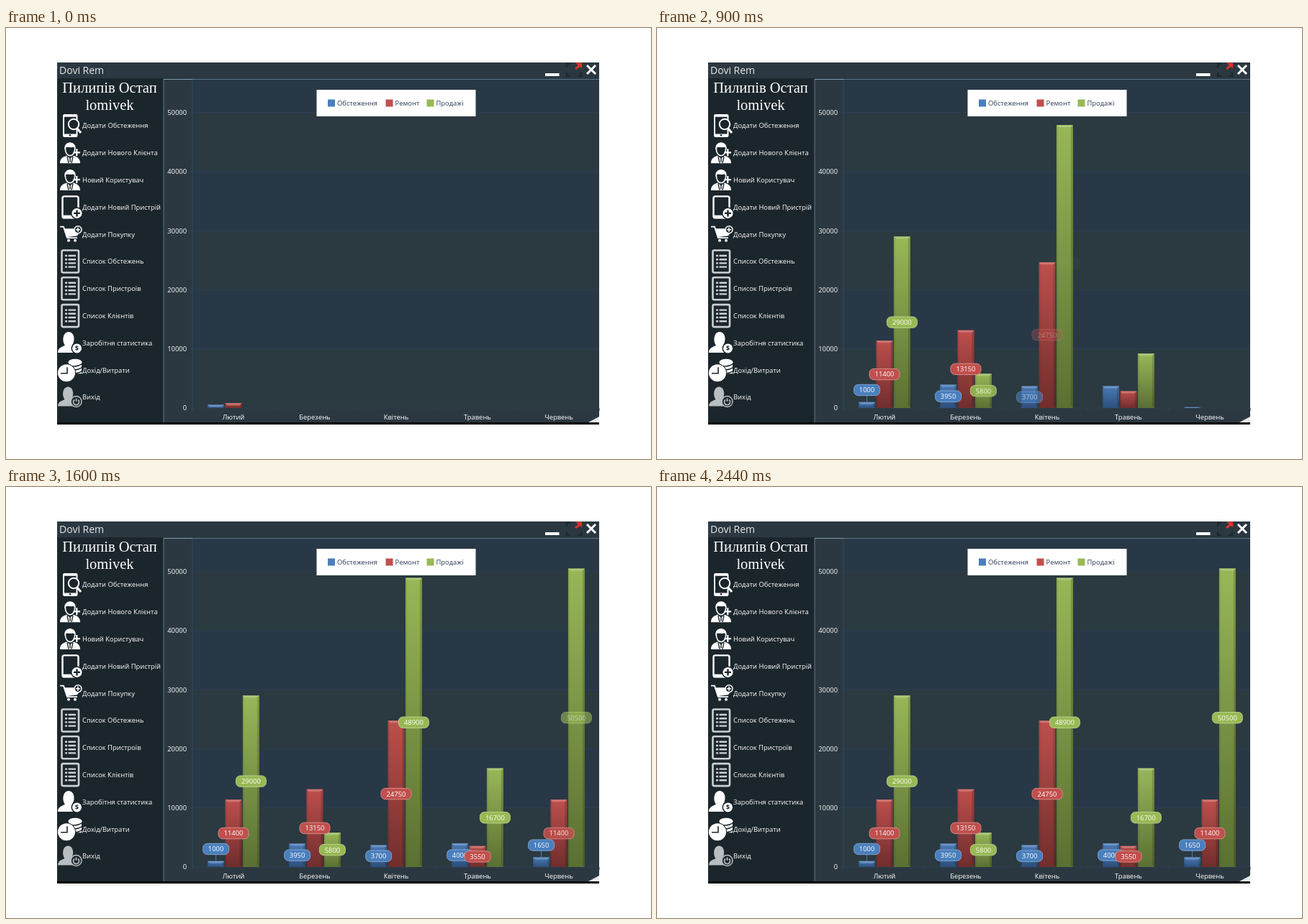
Recreate the animation shown at these times as an HTML page. Size 896 by 600 pixels, loop 3.5 s.

```html
<!DOCTYPE html>
<html lang="uk">
<head>
<meta charset="utf-8">
<style>
  html, body { margin: 0; width: 100%; height: 100%; overflow: hidden; background: #fff; }
  svg { display: block; }
  text { font: 500 9.4px "Open Sans", "Noto Sans", sans-serif; fill: #fff; }
  .mid { text-anchor: middle; }
  .end { text-anchor: end; }
  .title { font-size: 14px; font-weight: 400; fill: #e4e9ec; }
  .user { font: 20.5px "Liberation Serif", serif; text-anchor: middle; }
  .key { fill: #2b3b55; }
</style>
</head>
<body>
<svg width="896" height="600" viewBox="0 0 896 600">
  <defs>
    <linearGradient id="g0" x2="0" y2="1"><stop stop-color="#4a7ab5"/><stop offset="1" stop-color="#2d507c"/></linearGradient>
    <linearGradient id="g1" x2="0" y2="1"><stop stop-color="#bd4f4c"/><stop offset="1" stop-color="#702e2d"/></linearGradient>
    <linearGradient id="g2" x2="0" y2="1"><stop stop-color="#98b758"/><stop offset="1" stop-color="#5a7032"/></linearGradient>

    <g id="search" fill="none" stroke="#fff">
      <rect x="-9" y="-15" width="18.500" height="30" rx="1.500" stroke-width="2"/>
      <path d="M-9 13.300H9.500M-9 -14H9.500" stroke-width="3.600"/>
      <circle cx="5" cy="-2" r="7.200" fill="#1b262c" stroke-width="2"/>
      <path d="M10 4l5 6" stroke-width="3"/>
      <circle cy="13.300" r="1.200" fill="#1b262c" stroke="none"/>
    </g>
    <g id="client" fill="#fff">
      <path d="M-14 14.500C-14 7.500 -10 6 -5 4L0 8L5 4C10 6 14 7.500 14 14.500Z"/>
      <path d="M-6.500 -6C-7 -1 -4 4 0 4S7 -1 6.500 -6" fill="#1b262c" stroke="#fff" stroke-width="1.500"/>
      <path d="M-7.500 -4C-10 -18 10 -18 7.500 -4L5 -8C1 -7 -2 -8 -5 -8Z"/>
      <path d="M-4 5L-2 14M4 5L2 14M0 7V13" fill="none" stroke="#1b262c" stroke-width="1.400"/>
      <path d="M4.500 -.5H14M9.300 -5.500V4.500" stroke="#fff" stroke-width="2.200"/>
    </g>
    <g id="device">
      <rect x="-10.500" y="-15" width="22" height="30" rx="2.500" fill="none" stroke="#fff" stroke-width="2.400"/>
      <path d="M-10 13.500H11" stroke="#fff" stroke-width="4.500"/>
      <circle cx="9.500" cy="8.500" r="8.500" fill="#1b262c"/>
      <circle cx="9.500" cy="8.500" r="7" fill="#fff"/>
      <path d="M5 8.500H14M9.500 4V13" stroke="#1b262c" stroke-width="2.400"/>
    </g>
    <g id="cart">
      <path d="M-14 -10.500H-9L-4 5H10" fill="none" stroke="#fff" stroke-width="1.800"/>
      <path d="M-9 -8H5L12 -1L10 2L-5 4Z" fill="#fff"/>
      <circle cx="-2" cy="8.500" r="2" fill="#fff"/><circle cx="7" cy="8.500" r="2" fill="#fff"/>
      <circle cx="11" cy="-6.500" r="5" fill="#1b262c" stroke="#fff" stroke-width="1.500"/>
      <path d="M8 -6.500H14M11 -9.500V-3.500" stroke="#fff" stroke-width="1.600"/>
    </g>
    <g id="list" fill="none" stroke="#cbd1d4">
      <rect x="-11.500" y="-15.500" width="23.500" height="31" rx="2" stroke-width="2.600"/>
      <path d="M-7 -8H-4M-2.500 -8H8M-7 -2.800H-4M-2.500 -2.800H8M-7 2.400H-4M-2.500 2.400H8M-7 7.600H-4M-2.500 7.600H8" stroke-width="2.400"/>
    </g>
    <path id="person" d="M-17 13.500C-17 6 -11 6 -7 3C-11 -1 -11 -15 -2 -15.500C7 -15 7 -2 3 3C6 6 13 6 13 13.500Z"/>
    <g id="pay">
      <use href="#person" fill="#fff"/>
      <circle cx="9.500" cy="7.500" r="8" fill="#1b262c"/><circle cx="9.500" cy="7.500" r="6.500" fill="#fff"/>
      <text x="9.500" y="11" class="mid" style="fill:#1b262c;font-weight:700">$</text>
    </g>
    <g id="money">
      <path d="M-2 -10V5H16V-10Z" fill="#fff"/>
      <ellipse cx="7" cy="-11" rx="9.500" ry="4.500" fill="#fff"/>
      <path d="M-3 -8Q7 -2 17 -9M-3 -3Q7 3 17 -4M-3 2Q7 8 17 1" fill="none" stroke="#1b262c" stroke-width="1.300"/>
      <circle cx="-5" cy="4" r="13" fill="#1b262c"/><circle cx="-5" cy="4" r="12" fill="#fff"/>
      <path d="M-4 -4V4.500H-13" fill="none" stroke="#1b262c" stroke-width="1.600"/>
    </g>
    <g id="exit">
      <use href="#person" fill="#b9bec1" transform="translate(-1 0) scale(.93)"/>
      <circle cx="8.500" cy="6" r="7.500" fill="#1b262c" stroke="#b9bec1" stroke-width="1.500"/>
      <path d="M6 3.500A4 4 0 1 0 11 3.500M8.500 1.500V6" fill="none" stroke="#b9bec1" stroke-width="1.700"/>
    </g>
  </defs>
  <g id="stage"></g>
  <g id="chart"></g>
</svg>
<script>
const BASE = 529, UNIT = 0.00823;
const months = ["Лютий", "Березень", "Квітень", "Травень", "Червень"];
const series = [
  { name: "Обстеження", fill: "#4a7fbd", light: "#86a9d4", x: 447 },
  { name: "Ремонт", fill: "#c0504d", light: "#dc8f8d", x: 527.5 },
  { name: "Продажі", fill: "#98b954", light: "#bdd391", x: 584.5 }
];
const values = [1000, 11400, 29000, 3950, 13150, 5800, 3700, 24750, 48900,
  4000, 3550, 16700, 1650, 11400, 50500];
const menu = [
  ["search", "Додати Обстеження"], ["client", "Додати Нового Клієнта"],
  ["client", "Новий Користувач"], ["device", "Додати Новий Пристрій"],
  ["cart", "Додати Покупку"], ["list", "Список Обстежень"],
  ["list", "Список Пристроїв"], ["list", "Список Клієнтів"],
  ["pay", "Заробітня статистика"], ["money", "Дохід/Витрати"], ["exit", "Вихід"]
];
// time in ms, position of the growth wave
const wave = [[0, .145], [400, .678], [900, 1.578], [1300, 2.24], [1600, 2.61], [2440, 3.6]];
const LAG = .13;

const clamp = v => Math.max(0, Math.min(1, v));
const rect = (x, y, w, h, fill, more = "") =>
  `<rect x="${x}" y="${y}" width="${w}" height="${h}" fill="${fill}" ${more}/>`;
const path = (d, more) => `<path d="${d}" ${more}/>`;
const text = (x, y, s, cls = "") => `<text x="${x}" y="${y + 3.4}" class="${cls}">${s}</text>`;

function drawStage() {
  let s = rect(71, 48, 753, 504, "#2b3841") + rect(71, 70, 147.5, 479, "#1b262c");
  for (let i = 0; i < 6; i++) {
    const y = BASE - i * 82.3, top = i < 5 ? y - 82.3 : 72;
    s += rect(259, top, 565, y - top, i % 2 ? "#293846" : "#2b3940");
    s += path(`M254 ${y}H824`, 'stroke="#2b405a" stroke-width=".8"');
    s += text(251, y, i * 10000, "end");
  }
  s += path("M259 72V533", 'stroke="#2d4864"');
  for (let i = 1; i < 6; i++) s += path(`M${259 + i * 113} 529v4`, 'stroke="#2b405a"');
  s += path("M219 549V71.500H824", 'fill="none" stroke="#58758b"');
  s += path("M219 71.500H259", 'stroke="#7f9aac"');
  s += rect(71, 549, 753, 3, "#000") + path("M824 541V549H809Z", 'fill="#e8ecea"');

  s += text(74, 60.2, "Dovi Rem", "title");
  s += rect(749, 63, 19.5, 4, "#fff");
  s += path("M779 55V50H784M779 62V67H784M799 62V67H794", 'fill="none" stroke="#1b2a2f" stroke-width="2.5"');
  s += path("M791 48.500H800V56L797 54L792 58L790 56L795 52Z", 'fill="#e0342c"');
  s += path("M807 52L819 64M819 52L807 64", 'stroke="#fff" stroke-width="3"');
  s += text(144, 86.5, "Пилипів Остап", "user") + text(144, 110.5, "lomivek", "user");
  menu.forEach(([icon, label], i) => {
    const y = 136 + i * 37.8;
    s += `<use href="#${icon}" x="89" y="${y}"/>` + text(106, y, label);
  });

  s += rect(431.5, 86, 221, 37, "#fff");
  series.forEach(k => s += rect(k.x, 99.5, 10, 10, k.fill) + text(k.x + 13, 105, k.name, "key"));
  months.forEach((m, i) => s += text(316 + i * 113, 541.5, m, "mid"));
  document.getElementById("stage").innerHTML = s;
}

function wavePos(t) {
  let i = 1;
  while (i < wave.length - 1 && t > wave[i][0]) i++;
  const [t0, a] = wave[i - 1], [t1, b] = wave[i];
  return a + (b - a) * (t - t0) / (t1 - t0);
}

function bar(x, h, k) {
  const y = BASE - h, b = Math.min(3, h), l = x - 11.5, r = x + 11.5;
  return rect(l, y, 23, h, `url(#g${k})`)
    + path(`M${l} ${y}H${r}L${r - 3} ${y + b}H${l + 3}Z`, `fill="${series[k].light}" opacity=".6"`)
    + path(`M${r} ${y}V${BASE}L${r - 3} ${BASE - b}V${y + b}Z`, 'opacity=".16"')
    + path(`M${l} ${y}V${BASE}L${l + 2} ${BASE - b}V${y + b}Z`, 'opacity=".08"');
}

function tag(x, value, k, alpha) {
  const h = value * UNIT, small = h < 16, top = BASE - h;
  const y = small ? top - 16.8 : BASE - h / 2;
  const w = value < 10000 ? 36 : 42;
  return `<g opacity="${alpha}">`
    + (small ? path(`M${x} ${y + 8}V${top}`, `stroke="${series[k].fill}"`) : "")
    + rect(x - w / 2, y - 7.7, w, 15.4, series[k].fill, `rx="6" stroke="${series[k].light}" stroke-width=".9"`)
    + text(x, y, value, "mid") + "</g>";
}

function draw(now) {
  const t = now % 3500, pos = wavePos(t < 2440 ? Math.floor(t / 100) * 100 : 2440);
  let bars = "", tags = "";
  values.forEach((v, i) => {
    const k = i % 3, x = 316 + Math.floor(i / 3) * 113 + (k - 1) * 24.4;
    const u = pos - i * LAG, grow = 1 - (1 - clamp(u)) ** 5, alpha = clamp((u - .52) / .45);
    if (grow > 0) bars += bar(x, v * UNIT * grow, k);
    if (alpha > 0) tags += tag(x, v, k, alpha);
  });
  document.getElementById("chart").innerHTML = bars + tags;
}

drawStage();
const start = performance.now();
(function loop() {
  draw(performance.now() - start);
  requestAnimationFrame(loop);
})();
</script>
</body>
</html>
```
